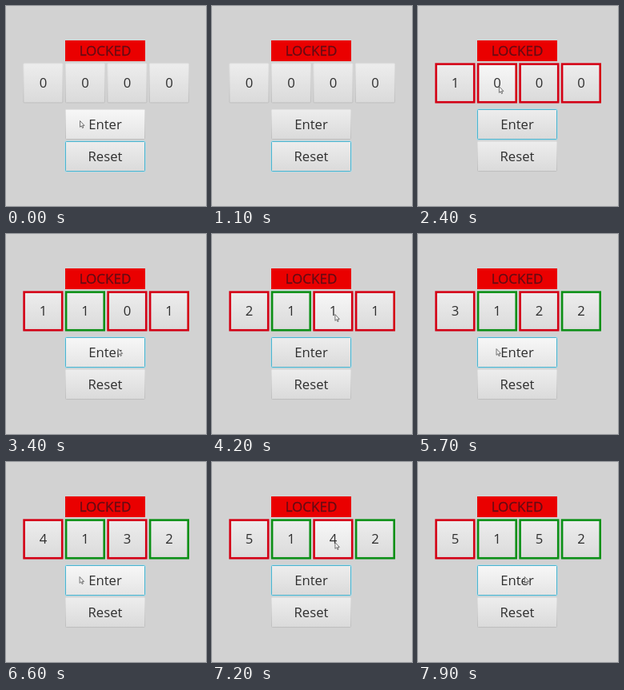
Animation of 250x250 px, one loop 8 s. Source, as an HTML page:

```html
<!DOCTYPE html>
<html lang="en">
<head>
<meta charset="utf-8">
<title>Combination lock</title>
<style>
html, body { margin: 0; width: 100%; height: 100%; overflow: hidden; background: #d2d2d2; }
svg { display: block; width: 100vw; height: 100vh; }
text { font-family: "Open Sans", "Noto Sans", sans-serif; font-size: 16.7px; fill: #2e2e2e; text-anchor: middle; }
.status { font-size: 17px; fill: #640c14; stroke: #640c14; stroke-width: .3px; }
</style>
</head>
<body>
<svg viewBox="0 0 250 250">
  <defs>
    <linearGradient id="face" x2="0" y2="1">
      <stop offset="0" stop-color="#ededed"/>
      <stop offset="1" stop-color="#dadada"/>
    </linearGradient>
    <linearGradient id="lit" x2="0" y2="1">
      <stop offset="0" stop-color="#f7f7f7"/>
      <stop offset="1" stop-color="#e4e4e4"/>
    </linearGradient>
    <linearGradient id="rim" x2="0" y2="1">
      <stop offset="0" stop-color="#e2e2e2"/>
      <stop offset="1" stop-color="#bebebe"/>
    </linearGradient>
  </defs>
  <rect width="250" height="250" fill="#d2d2d2"/>
  <rect x="74" y="43" width="100" height="26" fill="#ea0000"/>
  <text class="status" x="124" y="62.2">LOCKED</text>
  <g id="keys"></g>
  <path id="cursor" d="M.5 .5V8.4L2.3 6.8L3.6 9.6L4.8 9L3.6 6.4H6Z" fill="#f0f0f0" stroke="#555" stroke-width=".8"/>
</svg>
<script>
const LOOP = 8000, STEP = 100;
const RED = "#d40014", GREEN = "#0b9016";
const CODE = [null, 1, 5, 2];
// digits are dials, E is Enter
const ORDER = "E013E023E02E02E022E";
const FIRST = 1600, LAST = 7800;
const DWELL = 100, MS_PER_PX = 1.9;
const REST = { x: 92, y: 143 }, AWAY = { x: 63, y: 129 };
const HIDE = 1100, SHOW = 1400;

const keys = document.getElementById("keys");
const cursor = document.getElementById("cursor");

function set(el, attrs) {
  for (const k in attrs) el.setAttribute(k, attrs[k]);
}

function add(tag, attrs) {
  const el = document.createElementNS("http://www.w3.org/2000/svg", tag);
  set(el, attrs);
  return keys.appendChild(el);
}

function box(x, y, width, height, grow, attrs) {
  return add("rect", {
    x: x - grow, y: y - grow, width: width + 2 * grow, height: height + 2 * grow, ...attrs
  });
}

function makeKey(x, y, width, height, label) {
  const halo = box(x, y, width, height, .8, { rx: 2, fill: "#b4dce7" });
  const face = box(x, y, width, height, -.5, { rx: 1 });
  const text = add("text", { x: x + width / 2, y: y + height / 2 + 5.9 });
  text.textContent = label;
  return { x, y, width, height, halo, face, text };
}

const dials = [0, 1, 2, 3].map(i => {
  const x = 21.4 + 52.5 * i, y = 71.4, size = 50;
  const key = makeKey(x, y, size, size, "0");
  key.edge = box(x, y, size, size, -1.2, { fill: "none", "stroke-width": 2.6 });
  return key;
});
const enter = makeKey(74, 129, 100, 38, "Enter");
const reset = makeKey(74, 169, 100, 38, "Reset");

// clicks come a little faster as the search goes on
let tries = 0;
const clicks = [...ORDER].map((id, i) => {
  const u = (i / (ORDER.length - 1)) ** .83;
  const at = Math.round((FIRST + (LAST - FIRST) * u) / STEP) * STEP;
  if (id === "E") return { at, id, x: 117 + 31 * Math.cos(1.5 * tries++ - 2.25), y: 143 };
  return { at, id, x: dials[id].x + 27, y: 100 };
});
const stops = [{ at: SHOW, ...AWAY }, ...clicks];

const clamp = u => Math.min(1, Math.max(0, u));

function mix(a, b, u) {
  const e = u * u * (3 - 2 * u);
  return { x: a.x + (b.x - a.x) * e, y: a.y + (b.y - a.y) * e };
}

function pointer(t) {
  if (t < SHOW) return mix(REST, AWAY, clamp(t / 400));
  const i = stops.findIndex(s => s.at > t);
  if (i < 0) return stops[stops.length - 1];
  const from = stops[i - 1], to = stops[i];
  const travel = Math.hypot(to.x - from.x, to.y - from.y) * MS_PER_PX;
  return mix(from, to, clamp((t - from.at - DWELL) / (travel || 1)));
}

function stateAt(t) {
  const digits = [0, 0, 0, 0];
  let edges = null;
  for (const { at, id } of clicks) {
    if (at > t) break;
    if (id === "E") edges = digits.map((d, i) => d === CODE[i] ? GREEN : RED);
    else digits[id]++;
  }
  return { digits, edges };
}

function paint(key, focused, p) {
  const over = p && p.x >= key.x && p.x < key.x + key.width && p.y >= key.y && p.y < key.y + key.height;
  set(key.halo, { visibility: focused ? "visible" : "hidden" });
  set(key.face, {
    fill: over ? "url(#lit)" : "url(#face)",
    stroke: focused ? "#4cb4cf" : "url(#rim)"
  });
}

function draw(t) {
  const { digits, edges } = stateAt(t);
  const p = t >= HIDE && t < SHOW ? null : pointer(t);
  dials.forEach((key, i) => {
    paint(key, false, p);
    key.text.textContent = digits[i];
    set(key.edge, { stroke: edges ? edges[i] : "none" });
  });
  paint(enter, !!edges, p);
  paint(reset, !edges, p);
  set(cursor, { visibility: p ? "visible" : "hidden" });
  if (p) set(cursor, { transform: `translate(${p.x} ${p.y})` });
}

const start = performance.now();
function tick(now) {
  const t = Math.max(0, now - start) % LOOP;
  draw(Math.floor(t / STEP) * STEP);
  requestAnimationFrame(tick);
}
draw(0);
requestAnimationFrame(tick);
</script>
</body>
</html>
```
